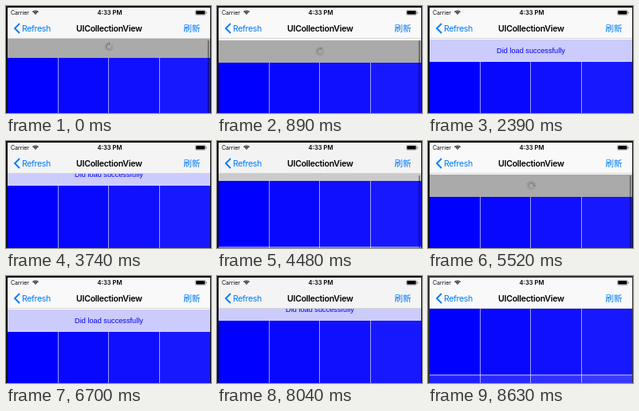
Animation, 257 px wide and 134 px high, one loop 8.73 s. Source, as an HTML page with a canvas:

```html
<!DOCTYPE html>
<html lang="en">
<head>
<meta charset="utf-8">
<title>Pull to refresh</title>
<style>
html, body { margin: 0; width: 100%; height: 100%; overflow: hidden; background: #111; }
canvas { display: block; width: 257px; height: 134px; }
</style>
</head>
<body>
<canvas id="stage"></canvas>
<script>
const W = 257, H = 134, LOOP = 8730, TICK = 148.8;
const BAR = 41, HEAD = 28, REST = 29, PEAK = 38, ROW = 83;
const SANS = 'Inter, sans-serif';
const canvas = document.getElementById('stage');
const ctx = canvas.getContext('2d');
const dpr = window.devicePixelRatio || 1;
canvas.width = W * dpr;
canvas.height = H * dpr;

// The two refreshes, in ticks: pull begins, finger lets go, loading ends
const refreshes = [
  { pull: -2.17, drop: 5, done: 13 },
  { pull: 28.83, drop: 35, done: 42 }
];

// Smooth 0 to 1, beginning at start and lasting span
function ease(k, start, span) {
  const x = Math.min(1, Math.max(0, (k - start) / span));
  return x * x * (3 - 2 * x);
}

function rect(x, y, w, h, color) {
  ctx.fillStyle = color;
  ctx.fillRect(x, y, w, h);
}

function pill(x, y, w, h, r, color) {
  ctx.fillStyle = color;
  ctx.beginPath();
  ctx.roundRect(x, y, w, h, r);
  ctx.fill();
}

function text(str, x, y, font, color, align = 'left', spacing = 0) {
  ctx.font = font;
  ctx.letterSpacing = spacing + 'px';
  ctx.textAlign = align;
  ctx.fillStyle = color;
  ctx.fillText(str, x, y);
}

function spinner(cx, cy, phase) {
  ctx.lineWidth = 1;
  ctx.lineCap = 'round';
  for (let i = 0; i < 12; i++) {
    const a = (i - 3) * Math.PI / 6;
    const tone = 98 + (phase - i + 24) % 12 * 5;
    ctx.strokeStyle = `rgb(${tone},${tone},${tone})`;
    ctx.beginPath();
    ctx.moveTo(cx + 2.8 * Math.cos(a), cy + 2.8 * Math.sin(a));
    ctx.lineTo(cx + 5.2 * Math.cos(a), cy + 5.2 * Math.sin(a));
    ctx.stroke();
  }
}

function cells(top) {
  for (let i = 0; i < 8; i++) {
    const tone = i * 8;
    rect(2 + (i % 4) * 63.5, top + (i >> 2) * ROW, 64, ROW, `rgb(${tone},${tone},255)`);
  }
  for (let i = 1; i < 4; i++)
    rect(Math.floor(1.6 + i * 63.5), top, 1, H, 'rgba(255,255,255,.6)');
  rect(2, top + ROW - 0.5, 254, 1, 'rgba(255,255,255,.75)');
}

function statusBar() {
  text('Carrier', 6, 11, `400 7px ${SANS}`, '#000');
  text('4:33 PM', 130, 11, `600 7.6px ${SANS}`, '#000', 'center');
  ctx.strokeStyle = '#000';
  ctx.lineWidth = 1.2;
  ctx.lineCap = 'butt';
  for (let r = 1; r <= 5; r += 2) {
    ctx.beginPath();
    ctx.arc(37, 11, r, -Math.PI * 0.75, -Math.PI * 0.25);
    ctx.stroke();
  }
  ctx.lineWidth = 0.5;
  ctx.strokeStyle = '#777';
  ctx.beginPath();
  ctx.roundRect(237.3, 5.3, 13, 6, 1.5);
  ctx.stroke();
  pill(238.2, 6.1, 11.2, 4.4, 0.8, '#000');
  rect(250.8, 7.4, 0.8, 2, '#555');
}

function navBar(tone) {
  rect(2, 2, 254, BAR - 2, `rgb(${tone},${tone},${tone})`);
  rect(2, BAR - 0.5, 254, 0.5, '#b2b2b2');
  statusBar();

  const blue = '#007aff';
  ctx.strokeStyle = blue;
  ctx.lineWidth = 1.8;
  ctx.beginPath();
  ctx.moveTo(17, 22);
  ctx.lineTo(11, 28);
  ctx.lineTo(17, 34);
  ctx.stroke();
  text('Refresh', 20, 32, `400 10.6px ${SANS}`, blue, 'left', -0.4);
  text('UICollectionView', 88, 32, `600 10.6px ${SANS}`, '#000', 'left', -0.3);
  text('刷新', 222.4, 32, '400 10.5px "Noto Sans CJK SC", "Noto Sans CJK", sans-serif', blue);
}

function draw(time) {
  const k = Math.floor((time % LOOP + 8) / TICK);
  const { pull, drop, done } = refreshes.findLast(r => r.pull <= k);
  const lift = (PEAK * ease(k, pull, 3.7) - (PEAK - REST) * ease(k, drop, 1.2))
    * (1 - ease(k, done + 11, 2));
  const banner = ease(k, done - 1, 4);
  const scroller = 1 - ease(k, drop + 1.5, 3);
  const shade = Math.min(1, Math.sqrt(lift / 24));
  const hidden = Math.max(0, 1 - lift / REST);
  const top = Math.round(BAR + lift);

  ctx.setTransform(dpr, 0, 0, dpr, 0, 0);
  rect(0, 0, W, H, k < 58 ? '#111' : '#333');
  ctx.save();
  ctx.beginPath();
  ctx.rect(2, BAR, 254, H - BAR);
  ctx.clip();
  rect(2, BAR, 254, H, '#fff');

  // Refresh header rides on top of the cells
  ctx.globalAlpha = shade;
  rect(2, top - HEAD, 254, HEAD, '#aaa');
  ctx.globalAlpha = 1;
  spinner(129.3, top - HEAD / 2, Math.floor(Math.max(0, k - drop) * 1.8) % 12);
  ctx.globalAlpha = banner;
  rect(2, top - HEAD, 254, HEAD, '#ccccfc');
  text('Did load successfully', 129, top - 11,
    '9.2px "Liberation Sans", Arial, sans-serif', '#0000f0', 'center');
  ctx.globalAlpha = 1;

  cells(top);
  pill(252.8, 43, 1.8, H, 0.9, `rgba(0,0,0,${0.4 * scroller})`);
  ctx.restore();
  navBar(249 - 14 * hidden * shade);
}

const start = performance.now();
function frame() {
  draw(performance.now() - start);
  requestAnimationFrame(frame);
}
frame();
</script>
</body>
</html>
```
